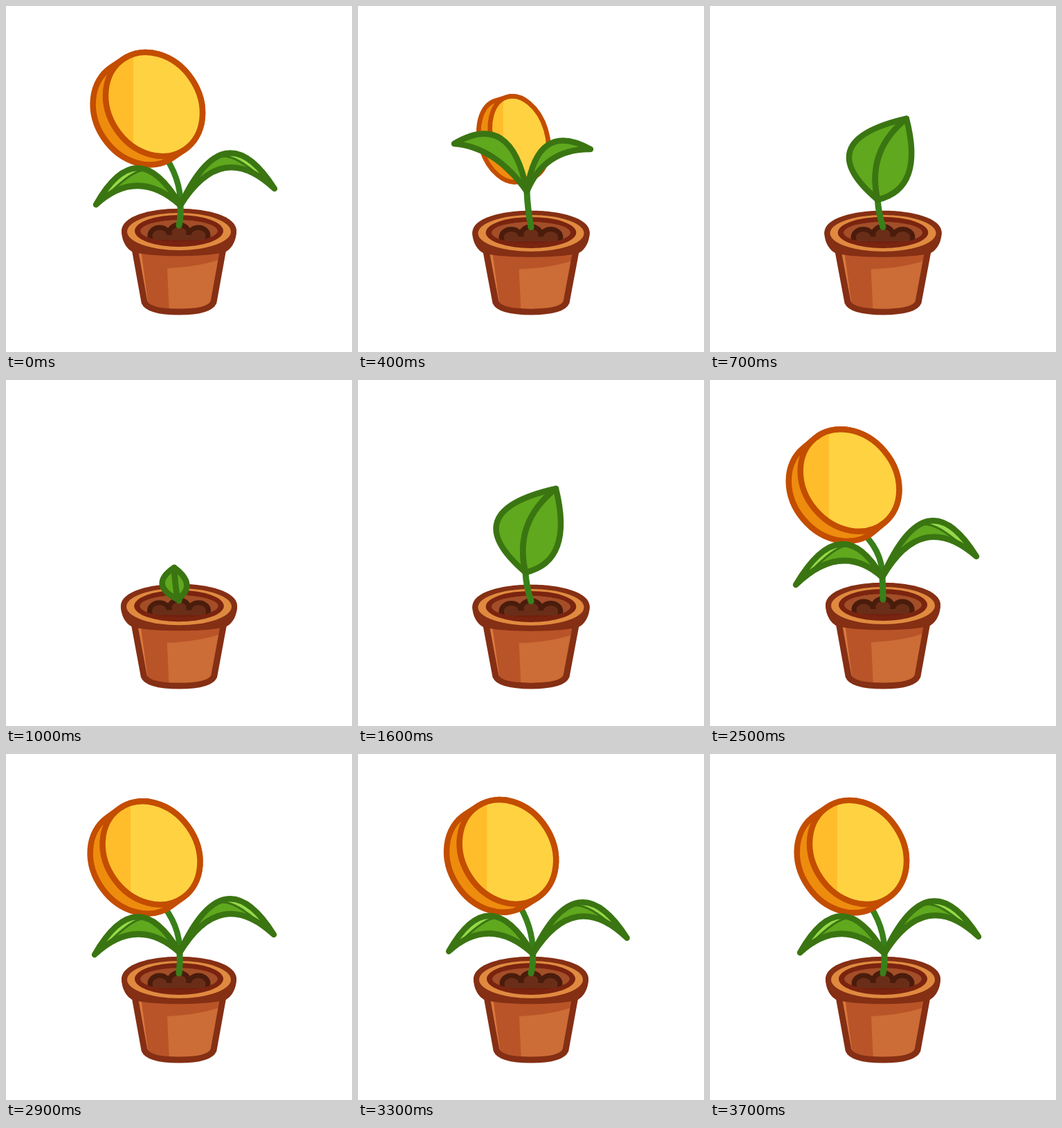
An HTML page with a canvas that plays this animation: 500 px wide and 500 px high, repeating every 3800 ms.

```html
<!DOCTYPE html>
<html>
<head>
<meta charset="utf-8">
<style>
html, body { margin: 0; width: 100%; height: 100%; overflow: hidden; background: #fff; }
canvas { display: block; width: 500px; height: 500px; }
</style>
</head>
<body>
<canvas id="stage" width="500" height="500"></canvas>
<script>
const ctx = document.getElementById('stage').getContext('2d');
const LOOP = 3800, STEP = 100;
const GREEN = '#3a7512', BROWN = '#852f14', RUST = '#c34d00';

// pot stretch | coin x, y, rx, ry, tilt | leaf base | left tip, inner, outer | right tip, inner, outer
const rest = [1, 214, 142, 65.5, 79, -34, 252, 288, 130, 287, 190, 181, 190, 232, 388, 264, 316, 150, 312, 192];
const lean = [1, 210, 143, 65.5, 79, -36, 251, 287, 128, 290, 190, 182, 190, 232, 387, 261, 315, 146, 310, 190];
const pop = [1.013, 231, 136, 64, 80, -25, 254, 287, 130, 306, 188, 195, 190, 233, 389, 309, 328, 178, 328, 224];
const small = [.98, 233, 190, 40, 61, -17, 244, 268, 139, 199, 222, 150, 199, 204, 336, 207, 259, 164, 270, 206];
const leaf = [.98, 240, 225, 0, 0, -10, 242, 278, 286, 157, 225, 205, 139, 190, 286, 157, 225, 205, 312, 262];
const bud = [.987, 245, 300, 0, 0, 0, 248, 317, 243, 271, 244, 292, 206, 296, 243, 271, 244, 292, 277, 296];

const mix = (a, b, k) => a.map((v, i) => v + (b[i] - v) * k);

// step, pose blend (weights past 0..1 overshoot)
const keys = [
  [0, rest],
  [1, mix(rest, lean, 1.1)],
  [2, mix(lean, small, .2)],
  [3, mix(lean, small, .62)],
  [4, small],
  [5, mix(small, leaf, .6)],
  [6, mix(bud, leaf, 1.38)],
  [7, mix(bud, leaf, .95)],
  [8, mix(bud, leaf, .5)],
  [9, mix(bud, leaf, .18)],
  [10, bud],
  [11, bud],
  [13, mix(bud, leaf, .2)],
  [16, leaf],
  [18, mix(bud, leaf, 1.62)],
  [19, mix(leaf, small, .85)],
  [20, mix(small, pop, .6)],
  [21, pop],
  [22, mix(small, pop, 1.16)],
  [23, mix(pop, lean, .6)],
  [24, mix(rest, lean, 2.6)],
  [25, mix(rest, lean, 3)],
  [29, lean],
  [33, mix(rest, lean, -.6)],
  [37, rest],
  [38, rest]
];

function poseAt(step) {
  const i = keys.findIndex(k => k[0] > step);
  const [a, p] = keys[i - 1], [b, q] = keys[i];
  return mix(p, q, (step - a) / (b - a));
}

function paint(fill, stroke, width) {
  if (fill) { ctx.fillStyle = fill; ctx.fill(); }
  if (stroke) { ctx.strokeStyle = stroke; ctx.lineWidth = width; ctx.stroke(); }
}

function oval(x, y, rx, ry, fill, stroke, width) {
  ctx.beginPath();
  ctx.ellipse(x, y, rx, ry, 0, 0, 7);
  paint(fill, stroke, width);
}

function shape(d, fill, stroke, width) {
  const p = new Path2D(d);
  if (fill) { ctx.fillStyle = fill; ctx.fill(p); }
  if (stroke) { ctx.strokeStyle = stroke; ctx.lineWidth = width; ctx.stroke(p); }
}

function drawPot(s) {
  ctx.save();
  ctx.translate(250, 446);
  ctx.scale(1 / s, s);
  ctx.translate(-250, -446);

  const body = 'M185 345L200 428Q206 442 250 442Q294 442 300 428L315 345Z';
  shape(body, '#cc6c36');
  ctx.save();
  ctx.clip(new Path2D(body));
  shape('M180 340H320V362Q285 377 233 379L236 445H206L194 352Z', '#b95428');
  shape('M184 345H194L207 442H196Z', '#da7a40');
  ctx.restore();
  shape(body, null, BROWN, 9);

  shape('M167 325C167 282 333 282 333 325C333 340 325 353 315 356C285 363 215 363 185 356C175 353 167 340 167 325Z', BROWN);
  oval(250, 326, 83, 33, BROWN);
  oval(250, 326, 75, 27, '#e08a40');
  oval(250, 325, 64, 23, '#7a2410');
  ctx.save();
  ctx.beginPath();
  ctx.ellipse(250, 325, 56, 16, 0, 0, 7);
  ctx.clip();
  paint('#a34e28');
  for (const [x, y] of [[222, 332], [278, 332], [250, 328]]) oval(x, y, 14, 12, '#6a2e18', '#4a1c0c', 7);
  ctx.fillStyle = '#6a2e18';
  ctx.fillRect(212, 331, 76, 8);
  ctx.fillStyle = '#74200f';
  ctx.fillRect(190, 338, 120, 8);
  ctx.restore();
  ctx.restore();
}

function drawCoin(x, y, rx, ry, tilt) {
  const w = 8.5 * Math.min(1, ry / 79), depth = .28 * ry, a = tilt * Math.PI / 180;
  ctx.save();
  ctx.translate(x, y);
  ctx.rotate(a);
  ctx.beginPath();
  ctx.ellipse(-depth, 0, rx, ry, 0, Math.PI / 2, Math.PI * 1.5);
  ctx.ellipse(0, 0, rx, ry, 0, -Math.PI / 2, Math.PI / 2);
  ctx.closePath();
  paint('#ee8c0e', RUST, w);
  oval(0, 0, rx, ry, '#f3b536');
  ctx.save();
  ctx.beginPath();
  ctx.ellipse(-.05 * ry, 0, rx, ry, 0, 0, 7);
  ctx.clip();
  oval(0, 0, rx, ry, '#ffd242');
  ctx.beginPath();
  ctx.ellipse(0, 0, rx, ry, 0, 0, 7);
  ctx.clip();
  ctx.rotate(-a);
  ctx.fillStyle = '#ffbd2c';
  ctx.fillRect(-200, -200, 200 - .38 * ry, 400);
  ctx.restore();
  oval(0, 0, rx, ry, null, RUST, w);
  ctx.restore();
}

function drawLeaf(bx, by, tx, ty, ix, iy, ox, oy, shine) {
  // Point along the leaf; m runs from the inner to the outer edge.
  const at = (t, m) => {
    const u = 1 - t;
    return [u * u * bx + 2 * u * t * (ix + (ox - ix) * m) + t * t * tx,
            u * u * by + 2 * u * t * (iy + (oy - iy) * m) + t * t * ty];
  };
  const outline = () => {
    ctx.beginPath();
    ctx.moveTo(bx, by);
    ctx.quadraticCurveTo(ix, iy, tx, ty);
    ctx.quadraticCurveTo(ox, oy, bx, by);
    ctx.closePath();
  };
  outline();
  paint('#60a81e');
  if (shine > 0) {
    ctx.globalAlpha = shine;
    ctx.beginPath();
    for (let t = .4; t <= 1; t += .05) ctx.lineTo(...at(t, 0));
    for (let t = 1; t >= .4; t -= .05) ctx.lineTo(...at(t, Math.min(1, (t - .4) * 2)));
    ctx.closePath();
    paint('#95d948', GREEN, 3);
    ctx.globalAlpha = 1;
  }
  outline();
  paint(null, GREEN, 8.5);
}

function drawSparkle(x, y, size) {
  const rays = [[-28, -2], [-29, 25], [-4, 26], [20, 14], [22, -8], [2, -24]];
  ctx.fillStyle = '#fff';
  for (const [dx, dy] of rays) {
    const n = 3.5 / Math.hypot(dx, dy);
    ctx.beginPath();
    ctx.moveTo(x - dy * n, y + dx * n);
    ctx.lineTo(x + dx * size, y + dy * size);
    ctx.lineTo(x + dy * n, y - dx * n);
    ctx.fill();
  }
  oval(x, y, 4 * size, 4 * size, '#fff');
}

function draw(now) {
  const step = Math.floor(now % LOOP / STEP);
  const [s, cx, cy, rx, ry, tilt, bx, by, ...tips] = poseAt(step);
  const shine = Math.min(1, (ry - 62) / 12);

  ctx.fillStyle = '#fff';
  ctx.fillRect(0, 0, 500, 500);
  ctx.lineCap = ctx.lineJoin = 'round';
  drawPot(s);

  if (rx > 2) {
    ctx.beginPath();
    ctx.moveTo(bx, by);
    ctx.quadraticCurveTo(bx + 1, by - ry / 2, cx + .15 * ry, cy + .88 * ry);
    paint(null, '#38801a', 8.5);
    drawCoin(cx, cy, rx, ry, tilt);
  }
  ctx.beginPath();
  ctx.moveTo(250, 446 - 129 * s);
  ctx.quadraticCurveTo(bx + 1, (by + 317) / 2, bx, by);
  paint(null, '#38801a', 9);
  drawLeaf(bx, by, ...tips.slice(0, 6), shine);
  drawLeaf(bx, by, ...tips.slice(6), shine);

  const glint = { 20: .5, 21: 1, 22: .6 }[step];
  if (glint) drawSparkle(cx + 43, cy - 63, glint);
}

const start = performance.now();
function tick() {
  draw(performance.now() - start);
  requestAnimationFrame(tick);
}
tick();
</script>
</body>
</html>
```
